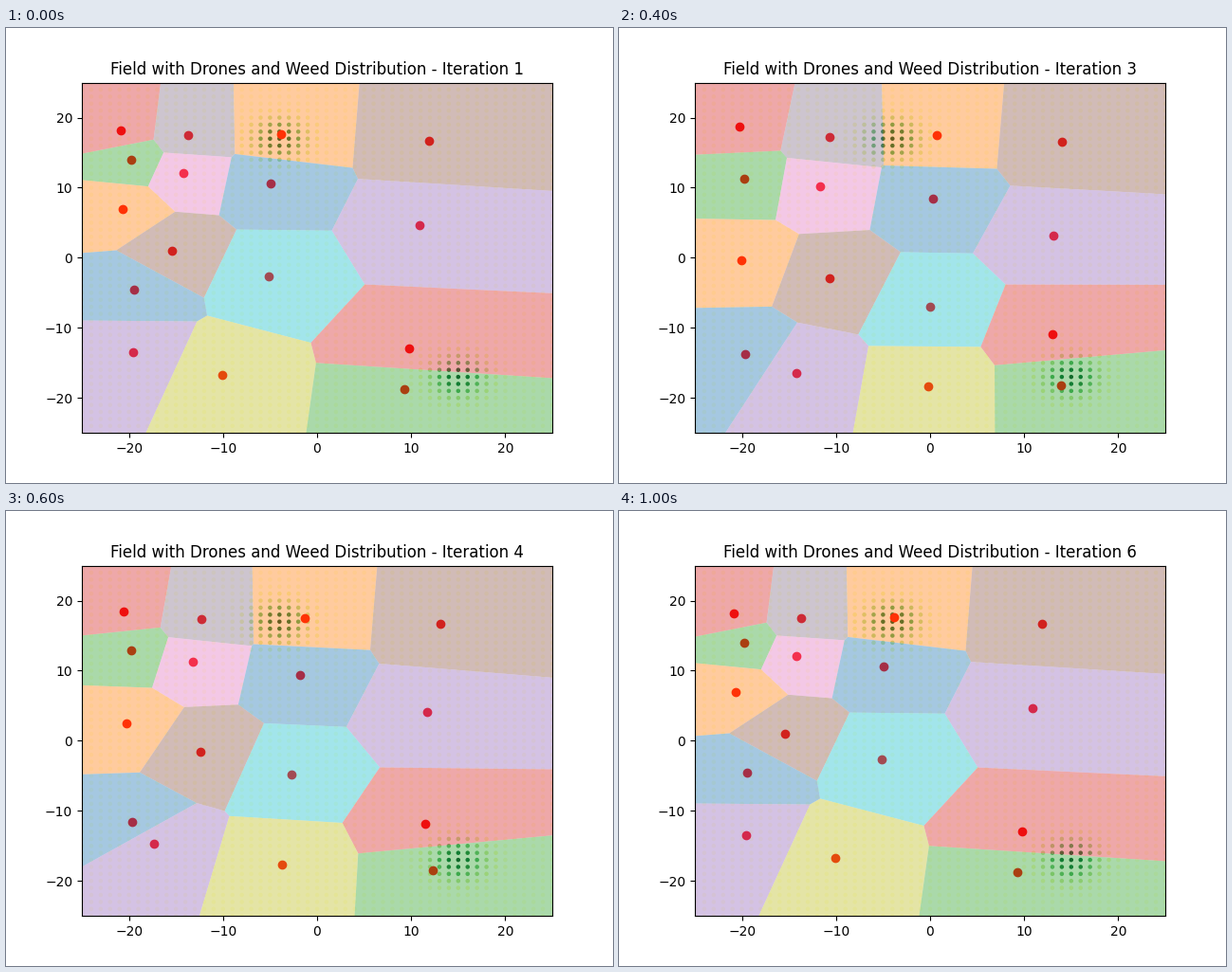
These frames come from a looping animation (640x480 px, 1.2 s). A matplotlib script:

```python
import numpy as np
import matplotlib.pyplot as plt
from matplotlib.animation import FuncAnimation
from matplotlib.patches import Polygon

HALF = 25
CYCLE = 5

# Per drone: cell colour, start and end in stage pixels, pace of the slow-down.
DRONES = [
    ("tab:red", (131, 101), (121, 108), 1.6),
    ("#826e87", (244, 116), (192, 113), 1.9),
    ("tab:orange", (357, 114), (290, 112), 1.4),
    ("tab:brown", (479, 120), (446, 119), 1.5),
    ("tab:green", (132, 177), (132, 139), 2.2),
    ("tab:pink", (235, 180), (187, 153), 2.2),
    ("tab:blue", (355, 187), (279, 164), 1.3),
    ("tab:purple", (479, 229), (436, 208), 2.4),
    ("tab:orange", (132, 267), (123, 191), 1.2),
    ("tab:brown", (240, 275), (175, 235), 1.1),
    ("tab:cyan", (362, 316), (277, 262), 1.8),
    ("tab:red", (476, 314), (425, 338), 1.6),
    ("tab:blue", (132, 358), (135, 276), 0.65),
    ("tab:purple", (234, 383), (134, 342), 2.2),
    ("tab:olive", (363, 382), (228, 366), 1.1),
    ("tab:green", (482, 376), (420, 381), 1.05),
]
colors, starts, ends, paces = (list(column) for column in zip(*DRONES))


def to_field(pixels):
    x, y = np.array(pixels, float).T
    return np.column_stack([(x - 328) / 9.92, (242.4 - y) / 7.392])


starts, ends, paces = to_field(starts), to_field(ends), np.array(paces)


def drones_at(frame):
    """The loop opens on the final layout, then eases from start to end."""
    t = (frame - 1) % CYCLE / (CYCLE - 1)
    eased = 1 - (1 - t) ** paces
    return starts + (ends - starts) * eased[:, None]


def clip(polygon, normal, limit):
    """Keep the part of a convex polygon where normal . p <= limit."""
    kept = []
    for a, b in zip(polygon, np.roll(polygon, -1, axis=0)):
        da, db = a @ normal - limit, b @ normal - limit
        if da <= 0:
            kept.append(a)
        if da * db < 0:
            kept.append(a + (b - a) * da / (da - db))
    return np.array(kept)


def voronoi_cell(points, index):
    cell = HALF * np.array([[-1, -1], [1, -1], [1, 1], [-1, 1]], float)
    p = points[index]
    for other in np.delete(points, index, axis=0):
        normal = other - p
        cell = clip(cell, normal, normal @ (p + other) / 2)
    return cell


def weed_patch(x, y, cx, cy, sigma=2):
    return np.exp(-((x - cx) ** 2 + (y - cy) ** 2) / (2 * sigma ** 2))


fig, ax = plt.subplots(figsize=(6.4, 4.8), dpi=100)
ax.set_xlim(-HALF, HALF)
ax.set_ylim(-HALF, HALF)

grid = np.arange(-HALF, HALF + 1)
gx, gy = np.meshgrid(grid, grid)
weeds = weed_patch(gx, gy, -4, 17) + weed_patch(gx, gy, 15, -17)
ax.scatter(gx, gy, c=weeds, cmap="YlGn", vmin=0, vmax=1, s=5)

points = drones_at(0)
drones = ax.scatter(*points.T, color="red", s=36)

# The translucent cells lie over the weeds and the drones.
cells = [ax.add_patch(Polygon(voronoi_cell(points, i), facecolor=color,
                              edgecolor="none", alpha=0.4))
         for i, color in enumerate(colors)]
title = ax.set_title("")


def update(frame):
    points = drones_at(frame)
    drones.set_offsets(points)
    for i, cell in enumerate(cells):
        cell.set_xy(voronoi_cell(points, i))
    title.set_text(f"Field with Drones and Weed Distribution - Iteration {frame + 1}")
    return [drones, title, *cells]


anim = FuncAnimation(fig, update, frames=CYCLE + 1, interval=200, repeat=True)
plt.show()
```
